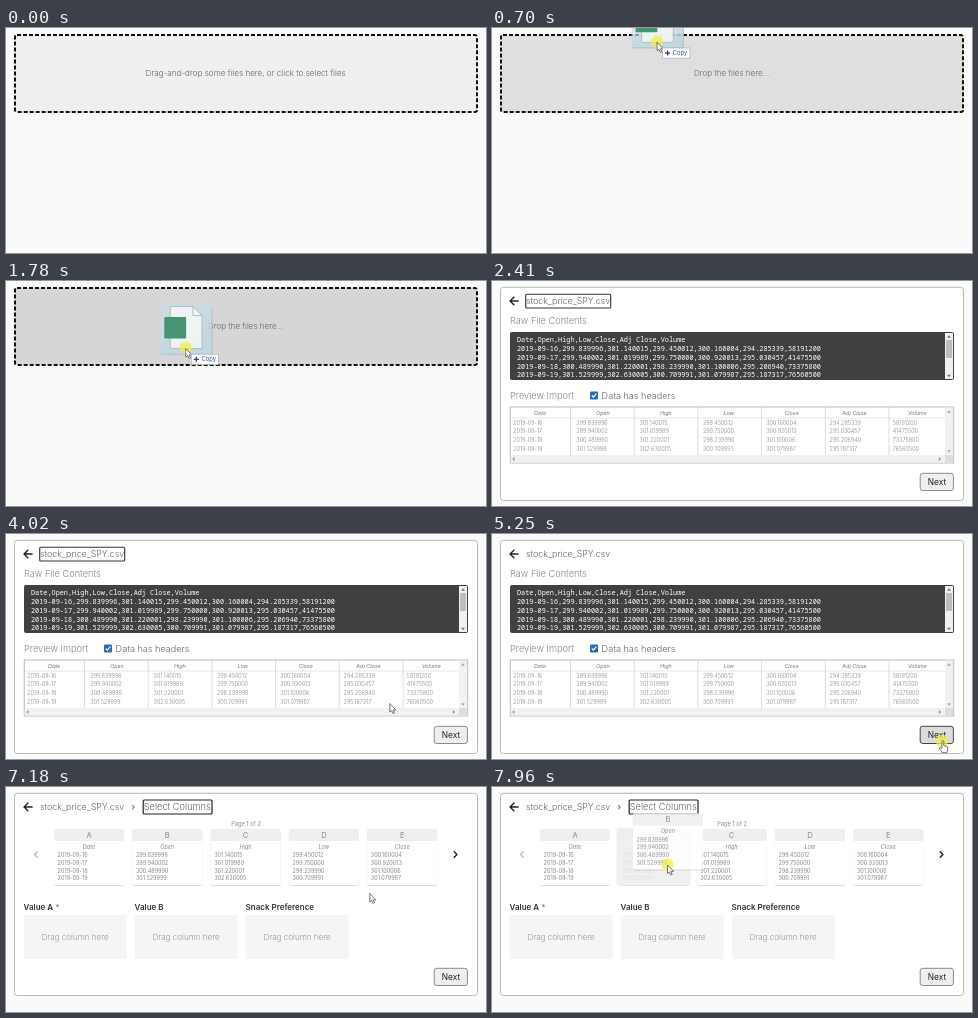
Animation of 480x225 px, one loop 8000 ms. Source, as an HTML page:

```html
<!DOCTYPE html>
<html lang="en">
<head>
<meta charset="utf-8">
<title>CSV import</title>
<style>
  html, body { margin: 0; width: 100%; height: 100%; overflow: hidden; background: #fafafa; }
  svg { display: block; width: 100vw; height: 100vh; }
  text { font-family: Inter, "Open Sans", sans-serif; white-space: pre; }
  .mono { font-family: "Noto Sans Mono", "DejaVu Sans Mono", monospace; font-weight: 500; }
  .light { font-weight: 300; }
</style>
</head>
<body>
<svg id="stage" viewBox="0 0 480 225"></svg>
<script>
const LOOP = 8000;
const names = ['Date', 'Open', 'High', 'Low', 'Close', 'Adj Close', 'Volume'];
const rows = [
  '2019-09-16,299.839996,301.140015,299.450012,300.160004,294.285339,58191200',
  '2019-09-17,299.940002,301.019989,299.750000,300.920013,295.030457,41475500',
  '2019-09-18,300.489990,301.220001,298.239990,301.100006,295.206940,73375800',
  '2019-09-19,301.529999,302.630005,300.709991,301.079987,295.187317,76560500'
];
const cells = rows.map(r => r.split(','));

// Markup helpers; text is placed by the middle of its capitals.
const text = (x, y, s, size, fill, more = '') =>
  `<text x="${x}" y="${y + size * .36}" font-size="${size}" fill="${fill}" ${more}>${s}</text>`;
const rect = (x, y, w, h, fill, more = '') =>
  `<rect x="${x}" y="${y}" width="${w}" height="${h}" fill="${fill}" ${more}/>`;
const line = (d, stroke, width) =>
  `<path d="${d}" fill="none" stroke="${stroke}" stroke-width="${width}"/>`;
const tri = (x, y, turn, fill) =>
  `<path d="M-2 1.2L0-1.2 2 1.2Z" transform="translate(${x} ${y}) rotate(${turn})" fill="${fill}"/>`;
const group = (id, body, more = '') => `<g id="${id}" ${more}>${body}</g>`;
const MID = 'text-anchor="middle"', LIGHT = 'class="light"';

const button = (id, y) => group(id,
  rect(428.2, y + .3, 33.2, 17.2, '#efefef', 'rx="2.5" stroke="#8a8a8a"') +
  text(445, y + 8.8, 'Next', 8.3, '#222', MID));

const panel = h =>
  rect(8.5, 6.3, 463, h, '#fff', 'rx="3" stroke="#b8b8b8"') +
  line('M26.6 20H18.3M22.3 15.8l-4.2 4.2 4.2 4.2', '#222', 1.4) +
  text(34, 20, 'stock_price_SPY.csv', 8.8, '#666', LIGHT);

function dropZone() {
  return rect(9, 7, 462, 77, '#efefef',
      'id="zone" rx="2" stroke="#111" stroke-width="2" stroke-dasharray="4 2"') +
    text(239.7, 45, 'Drag-and-drop some files here, or click to select files', 8.1, '#666', MID + ' id="idle" ' + LIGHT) +
    text(239.7, 45, 'Drop the files here...', 8, '#666', MID + ' id="over" ' + LIGHT);
}

function preview() {
  let s = panel(213.2) + rect(33.7, 13.2, 85, 13.8, 'none', 'id="focus" stroke="#333" stroke-width="1.1" rx="1"');
  s += text(18, 40, 'Raw File Contents', 9.2, '#888', LIGHT);
  s += rect(18, 51, 444, 48, '#404040', 'rx="2"');
  [names.join(','), ...rows].forEach((r, i) => {
    s += text(25, 59 + i * 8.75, r, 6.85, '#fff', 'class="mono"');
  });
  s += rect(453, 52, 8, 46, '#f0f0f0') + rect(454, 59, 6, 18, '#bdbdbd') +
    tri(457, 55.5, 0, '#777') + tri(457, 95, 180, '#777');

  s += text(18, 114.5, 'Preview Import', 9.2, '#888', LIGHT);
  s += rect(98, 110.5, 8, 8, '#2d6cb0', 'rx="1"') + line('M99.8 114.5l1.6 1.7 3-3.6', '#fff', 1.1);
  s += text(109.6, 114.5, 'Data has headers', 9.1, '#666', LIGHT);

  s += rect(18.3, 126, 443.4, 56, '#fff', 'stroke="#bcbcbc"');
  names.forEach((n, c) => {
    const x = 21 + c * 63.3;
    if (c) s += line(`M${14.8 + c * 63.7} 126.5V174`, '#d4d4d4', .8);
    s += text(48 + c * 62.9, 132, n, 5.4, '#777', MID + ' font-style="italic"');
    cells.forEach((r, i) => { s += text(x, 141.8 + i * 8.7, r[c], 5.5, '#858585', LIGHT); });
  });
  s += line('M19 137H453', '#e0e0e0', .8);
  s += rect(453, 126.5, 8, 55, '#f1f1f1') + rect(18.8, 174, 434, 7.5, '#f1f1f1') +
    rect(453, 174, 8.2, 7.5, '#dcdcdc');
  s += tri(457, 130.5, 0, '#aaa') + tri(457, 170.5, 180, '#aaa') +
    tri(21.3, 178, -90, '#999') + tri(448, 178, 90, '#999');
  return s + button('next', 192);
}

const CARD = 70;
const cardX = i => 48 + i * 78.3;
function card(i) {
  const x = cardX(i);
  let s = rect(x, 42.5, CARD, 56.5, '#000', 'rx="2.5" opacity=".14"') +
    rect(x, 42, CARD, 56, '#fff', 'rx="2"') + rect(x, 42, CARD, 12, '#efefef', 'rx="1"') +
    text(x + 35, 48.2, 'ABCDE'[i], 7.6, '#888', MID) +
    text(x + 35, 59.8, names[i], 5.5, '#888', MID + ' font-style="italic"');
  cells.forEach((r, k) => { s += text(x + 3.6, 68.4 + k * 7.6, r[i], 5.5, '#888'); });
  return s;
}

function columns() {
  let s = panel(202.2) + text(125.5, 19.8, '›', 9.5, '#444') +
    rect(137.2, 13, 68.8, 14, 'none', 'stroke="#222" stroke-width="1.2" rx="1"') +
    text(137.8, 20, 'Select Columns', 9.2, '#666', LIGHT) +
    text(240, 37.2, 'Page 1 of 2', 5.7, '#8a8a8a', MID);
  for (let i = 0; i < 5; i++) s += card(i);
  s += line('M31.5 64.5l-3 3 3 3', '#b5b5b5', 1.2) + line('M447.8 64.3l3.1 3.2-3.1 3.2', '#222', 1.4);
  ['Value A', 'Value B', 'Snack Preference'].forEach((n, i) => {
    const x = 17.6 + i * 111;
    s += text(x, 120.3, n + (i ? '' : ' <tspan fill="#888">*</tspan>'), 8, '#333', 'font-weight="600"');
    s += rect(x, 128, 103, 44, '#f5f5f5');
    s += text(x + 51.5, 150, 'Drag column here', 8.1, '#999', MID + ' ' + LIGHT);
  });
  s += button('next2', 181);
  s += group('lifted',
    rect(124.5, 41, 74, 57.5, '#eee', 'rx="2" opacity=".86"') +
    group('ghost', card(1), 'opacity=".88" transform="translate(14.6 -15.5)"'));
  return s;
}

const fileDrag =
  rect(-25.5, -46, 52, 52, 'url(#tint)') + line('M-25 5.6H26.2V-40', '#9db5c1', .7) +
  '<path d="M-15.5-42H7L16.2-33V0H-15.5Z" fill="#f3f6f6" stroke="#a4b0b4" stroke-width=".8" opacity=".9"/>' +
  line('M7-42V-33H16.2', '#a4b0b4', .8) +
  rect(-21.5, -31.5, 21.8, 21.5, '#439573', 'rx="1"');
const copyTip =
  rect(5.5, 5.7, 27.3, 10.2, '#fff', 'stroke="#b4b4b4" stroke-width=".8"') +
  line('M8 10.8h5M10.5 8.3v5', '#1d3f78', 1.3) + text(15.6, 10.8, 'Copy', 5.9, '#27508c');

const outline = 'stroke="#555" stroke-width=".8" stroke-linejoin="round"';
const cursors =
  group('arrow', `<path d="M0 0V8.6L1.9 6.9 3.2 10 4.7 9.4 3.4 6.4H6Z" fill="#fff" ${outline}/>`) +
  group('ibeam', line('M-2-4.2H2M0-4.2V4.2M-2 4.2H2', '#fff', .9)) +
  group('hand', `<path d="M-.1-.4Q.8-1.6 1.7-.4V4L5.6 5.2V8.5L4.8 11.2H.2L-2.8 6.6-1.9 5.7-.1 7Z" fill="#fff" ${outline}/>`) +
  group('grab', `<path d="M-3.4-.4L-2.3-.9-1.9.3V-4L-.9-4.4V-5H.3V-4.5L1.5-4.7V-3.7L3-3.8V1.5L2 4.4H-1.6Z" fill="#fff" ${outline}/>`);

const svg = document.getElementById('stage');
svg.innerHTML =
  `<defs><linearGradient id="tint" x1="0" y1="0" x2=".5" y2="1">
    <stop offset="0" stop-color="#c9dfea" stop-opacity=".45"/>
    <stop offset="1" stop-color="#bfd6e2" stop-opacity=".85"/></linearGradient></defs>` +
  group('drop', dropZone()) + group('preview', preview()) + group('columns', columns()) +
  group('pointer', group('file', fileDrag) +
    '<circle id="press" cy="-.5" r="6.2" fill="#f0ee4a" opacity=".75"/>' +
    cursors + group('copy', copyTip));

const el = {};
svg.querySelectorAll('[id]').forEach(e => el[e.id] = e);
const show = (id, on) => el[id].style.display = on ? '' : 'none';
const set = (node, attrs) => { for (const k in attrs) node.setAttribute(k, attrs[k]); };

const linear = p => p;
const easeOut = p => p * (2 - p);
const smooth = p => p * p * (3 - 2 * p);
const smoother = p => p * p * p * (p * (6 * p - 15) + 10);

function steps(t, start, end, n) {
  if (t < start) return 0;
  const k = Math.floor((t - start) / Math.max(1, end - start) * (n - 1) + .12);
  return Math.min(n, k + 1) / n;
}

// start, end, steps, x, y, easing
const moves = [
  [630, 1780, 16, 179.8, 67.5, linear],
  [3020, 3100, 2, 198, 81, linear],
  [3180, 3180, 1, 206, 73.5, linear],
  [3480, 4250, 11, 423.5, 191, smooth],
  [4330, 5020, 10, 450, 207.5, easeOut],
  [6340, 6880, 8, 398.5, 112, smoother],
  [7110, 7640, 8, 176.5, 76, smooth],
  [7960, 7960, 1, 175.5, 78, linear]
];

function pointerAt(t) {
  let x = 163, y = 6.7;
  for (const [start, end, n, tx, ty, ease] of moves) {
    const p = ease(steps(t, start, end, n));
    x += (tx - x) * p;
    y += (ty - y) * p;
  }
  return [x, y];
}

const inside = (x, y, l, t, r, b) => x >= l && x <= r && y >= t && y <= b;

function cursorKind(t, x, y) {
  if (t < 630 || (t >= 2410 && t < 2640)) return '';
  if (t < 2410) return 'arrow';
  if (t < 5400) {
    if (inside(x, y, 18, 51, 453, 99)) return 'ibeam';
    return inside(x, y, 428, 192, 462, 210) ? 'hand' : 'arrow';
  }
  const overCard = [0, 1, 2, 3, 4].some(i => inside(x, y, cardX(i), 42, cardX(i) + CARD, 98));
  return overCard && t < 7960 ? 'grab' : 'arrow';
}

function draw(t) {
  const [x, y] = pointerAt(t);
  const kind = cursorKind(t, x, y);
  const dragging = t >= 630 && t < 2410;
  const clicked = t >= 5170 && t < 5400;

  show('drop', t < 2410);
  show('preview', t >= 2410 && t < 5400);
  show('columns', t >= 5400);

  const grey = Math.round(239 - 25 * Math.min(1, steps(t, 630, 1400, 11) * 3.52));
  set(el.zone, { fill: `rgb(${grey},${grey},${grey})` });
  show('idle', !dragging);
  show('over', dragging);

  show('focus', t < 5170);
  set(el.next.firstChild, {
    fill: kind === 'hand' ? '#dcdcdc' : '#efefef',
    stroke: clicked ? '#444' : '#8a8a8a'
  });

  show('lifted', t >= 7960);
  show('file', dragging);
  show('copy', dragging);
  show('press', dragging || clicked || t >= 7890);
  for (const c of ['arrow', 'ibeam', 'hand', 'grab']) show(c, c === kind);
  set(el.pointer, { transform: `translate(${x.toFixed(2)} ${y.toFixed(2)})` });
}

function tick() {
  draw(performance.now() % LOOP);
  requestAnimationFrame(tick);
}
tick();
</script>
</body>
</html>
```
